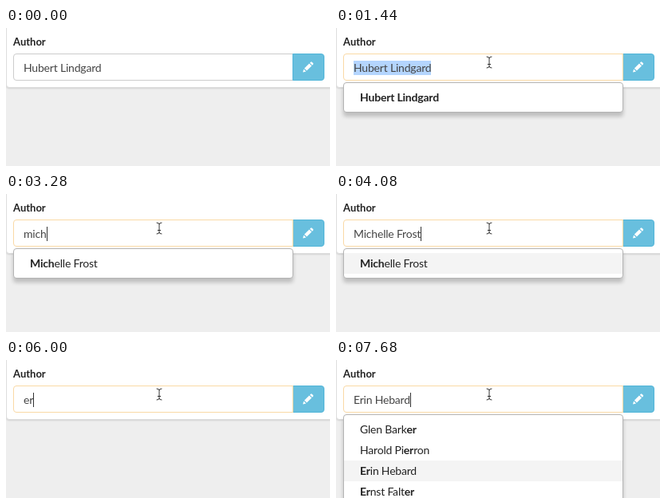
An HTML page for the animation above (8000 ms loop, 406x173 px).

```html
<!DOCTYPE html>
<html lang="en">
<head>
<meta charset="utf-8">
<title>Author picker</title>
<style>
  html, body { margin: 0; width: 100%; height: 100%; overflow: hidden; background: #eee; }
  body { position: relative; font: 14px/20px Lato, "Open Sans", sans-serif; letter-spacing: -.2px; color: #222; }
  div, svg { position: absolute; box-sizing: border-box; }
  .panel { left: 0; top: -10px; width: 420px; height: 85px; background: #fff; border: 1px solid #ddd;
    border-radius: 4px; box-shadow: 0 1px 2px rgba(0,0,0,.12); }
  .label { left: 9px; top: 7px; font-size: 13px; font-weight: 700; letter-spacing: 0; }
  .field { left: 9px; top: 32px; width: 351px; height: 34px; background: #fff; border: 1px solid #ccc;
    border-radius: 4px 0 0 4px; }
  .button { left: 359px; top: 32px; width: 40px; height: 34px; background: #68bfde; border: 1px solid #52b5d8;
    border-radius: 0 4px 4px 0; }
  .value { left: 22px; top: 41px; height: 18px; line-height: 18px; white-space: pre; color: #444; z-index: 2; }
  .value.selected { background: #b4d5fe; }
  .caret { left: 100%; top: 0; width: 1px; height: 18px; background: #333; }
  .menu { left: 9px; top: 68px; width: 351px; padding: 5px 0; background: #fff; border: 1px solid #b4b4b4;
    border-radius: 4px; box-shadow: 0 5px 5px rgba(0,0,0,.2); z-index: 2; }
  .menu p { margin: 0; padding: 3px 20px; height: 26px; box-sizing: border-box; white-space: pre; }
  .menu p.active { background: #f4f4f4; }
  svg { left: 0; top: 0; width: 406px; height: 173px; z-index: 3; }
</style>
</head>
<body>
<div class="panel"></div>
<div class="label">Author</div>
<div class="field" id="field"></div>
<div class="button"></div>
<div class="value" id="value"><span id="text"></span><div class="caret" id="caret"></div></div>
<div class="menu" id="menu"></div>
<svg viewBox="0 0 406 173">
  <path fill="#fff" d="M372 55.5l1.1-4 2.9 2.9zM373.9 50.6l6.1-6.1 3 3-6.1 6.1zM380.8 43.7l1-1q.8-.8 1.6 0l1.4 1.4q.8.8 0 1.6l-1 1z"/>
  <g id="cursor" fill="none">
    <path id="beam" d="M-3 -7Q0 -7 0 -5Q0 -7 3 -7M0 -5V5M-3 7Q0 7 0 5Q0 7 3 7M-1.7 2.5H1.7" stroke-linecap="round"/>
    <use href="#beam" stroke="#fff" stroke-width="2.4"/>
    <use href="#beam" stroke="#333" stroke-width="1"/>
  </g>
</svg>
<script>
const LOOP = 8000, TICK = 80, FOCUS = 1040;
const $ = id => document.getElementById(id);

const first = "Hubert Lindgard", second = "Michelle Frost";
const people = ["Glen Barker", "Harold Pierron", "Erin Hebard", "Ernst Falter"];

// Each step changes only the listed properties of the state.
const steps = [
  [0, { text: first, caret: false, selected: false, items: [], query: "", active: -1, fade: 1 }],
  [FOCUS, { caret: true }],
  [1200, { caret: false, selected: true }],
  [1360, { items: [first], query: first, fade: .5 }],
  [1440, { fade: 1 }],
  [2640, { text: "m", caret: true, selected: false, fade: .5 }],
  [2720, { text: "mi", items: [] }],
  [2880, { text: "mic" }],
  [3040, { text: "mich" }],
  [3280, { items: [second], query: "mich", fade: 1 }],
  [4080, { text: second, active: 0 }],
  [5280, { selected: true, caret: false }],
  [5680, { text: "e", selected: false, caret: true, items: [], active: -1 }],
  [6000, { text: "er" }],
  [6240, { items: people, query: "er" }],
  [6880, { text: people[0], active: 0 }],
  [7520, { text: people[1], active: 1 }],
  [7680, { text: people[2], active: 2 }]
];

const clamp = x => Math.min(1, Math.max(0, x));
const mix = (a, b, k) => a + (b - a) * k;

function pointer(t) {
  if (t < 880) {
    const k = 1 - (1 - clamp((t - 160) / 480)) ** 2;
    return [mix(245, 187, k), mix(168, 53, k)];
  }
  const k = clamp((t - 880) / 160);
  return [mix(186, 192, k), mix(44, 43, k)];
}

function drawMenu({ items, query, active, fade }) {
  const match = new RegExp(query, "gi");
  $("menu").style.display = items.length ? "block" : "none";
  $("menu").style.opacity = fade;
  $("menu").innerHTML = items.map((name, i) =>
    `<p class="${i === active ? "active" : ""}">${name.replace(match, "<b>$&</b>")}</p>`).join("");
}

let shown = -1;
function drawState(t) {
  const count = steps.filter(([at]) => at <= t).length;
  if (count === shown) return;
  shown = count;
  const state = Object.assign({}, ...steps.slice(0, count).map(([, change]) => change));
  $("text").textContent = state.text;
  $("value").classList.toggle("selected", state.selected);
  $("caret").style.display = state.caret ? "block" : "none";
  drawMenu(state);
}

function drawField(t) {
  const k = clamp((t - FOCUS + TICK) / 240);
  const [r, g, b] = [250, 217, 165].map(c => Math.round(mix(204, c, k)));
  $("field").style.borderColor = `rgb(${r},${g},${b})`;
  $("field").style.zIndex = t < FOCUS ? 0 : 1;
}

function draw() {
  const t = Math.floor(performance.now() % LOOP / TICK) * TICK;
  drawState(t);
  drawField(t);
  const [x, y] = pointer(t);
  $("cursor").setAttribute("transform", `translate(${x.toFixed(1)} ${y.toFixed(1)})`);
  $("cursor").style.display = t < 160 ? "none" : "";
  requestAnimationFrame(draw);
}
draw();
</script>
</body>
</html>
```
